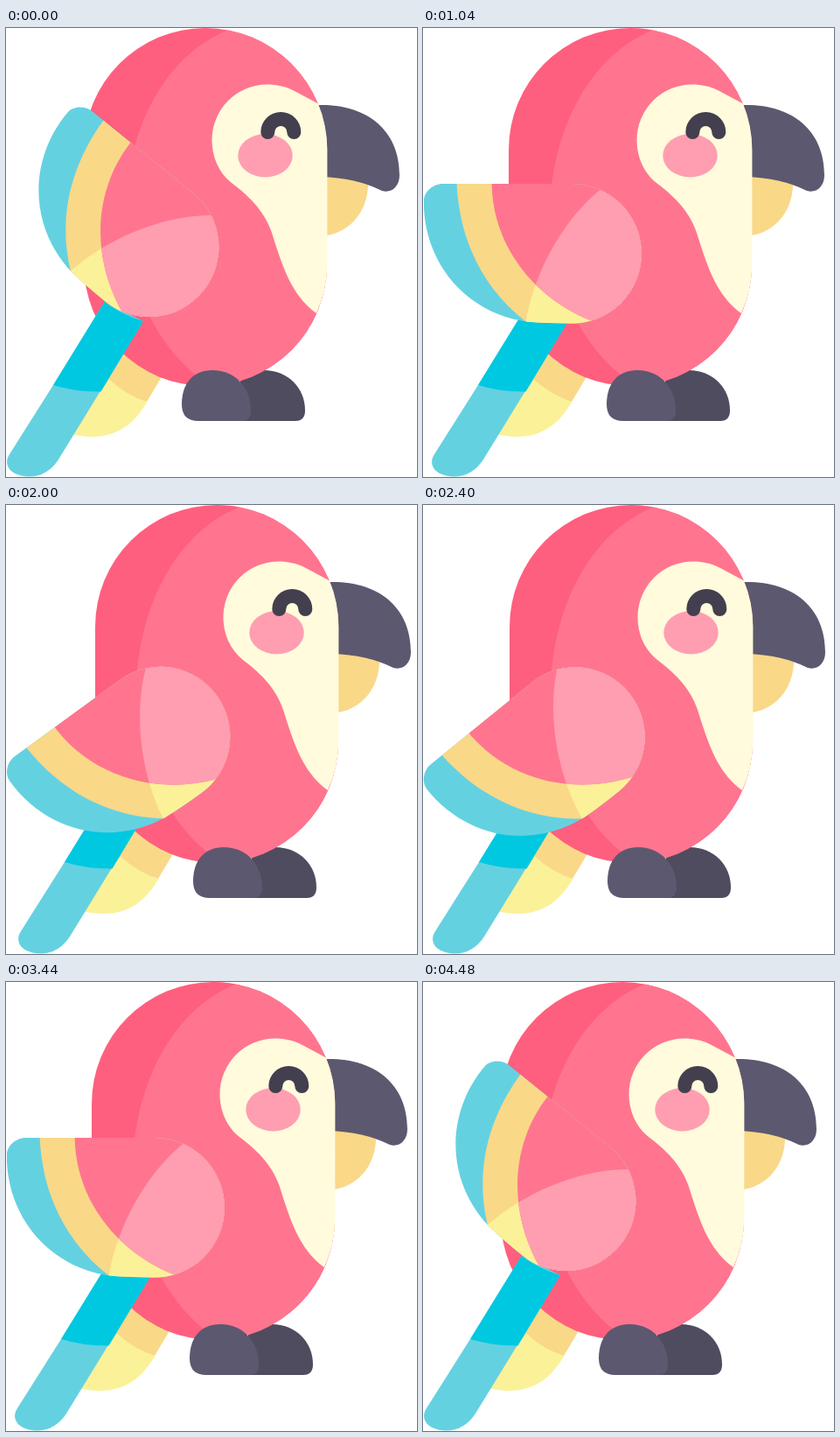
Recreate the animation shown at these times as an HTML page. Size 470 by 513 pixels, loop 4560 ms.

```html
<!DOCTYPE html>
<html lang="en">
<head>
<meta charset="utf-8">
<title>Parrot flapping its wing</title>
<style>
  html, body { margin: 0; width: 100%; height: 100%; overflow: hidden; background: #fff; }
  svg { display: block; }
</style>
</head>
<body>
<svg width="470" height="513" viewBox="0 0 470 513">
  <defs>
    <clipPath id="bodyClip"><rect x="89" width="278" height="409" rx="139"/></clipPath>
    <clipPath id="wingClip">
      <path id="wingShape" d="M.2 198C.2 270 50 327 120 335.800Q143 337.500 169.500 337.500A79.750 79.750 0 0 0 169.500 178H22C11 178 .2 187 .2 198Z"/>
    </clipPath>
    <path id="wingRed" d="M78 170V178C79 245 122 307 193 335L200 350H300V170Z"/>
    <clipPath id="redClip"><use href="#wingRed"/></clipPath>
    <path id="sheen" d="M230 165L203 184C160 218 126 280 117 335.500L115 350H300V165Z"/>
  </defs>
  <g id="bird">
    <!-- rear tail feather and rear foot -->
    <path fill="#f9d888" d="M125 360H201L161 427 100 440Z"/>
    <path fill="#fbf198" d="M118 401.500Q138 420 161.500 427C145 455 125 467 98 467Q86 467 70 463Z"/>
    <path fill="#4f4c5f" d="M268 449V391H295C322 391 342 411 342 437Q342 449 331 449Z"/>

    <!-- beak -->
    <path fill="#f9d888" d="M355 165L414 172C416 206 396 232 367 237H355Z"/>
    <path fill="#5c586f" d="M350 88H358C412 87 450 116 450 168C450 182 440 189 430 186Q400 171 360 170Z"/>

    <!-- body -->
    <g clip-path="url(#bodyClip)">
      <rect x="80" width="300" height="420" fill="#ff5f7e"/>
      <path fill="#ff758f" d="M261 0L255 2C188 28 141 105 136 205C138 285 165 360 228 405L240 415H380V0Z"/>
    </g>
    <path fill="#fffbdc" d="M357 86.500L329 71.500C319 66.500 309 64.500 299 64.500A63.500 63.500 0 0 0 235.500 128C235.500 148 244 166 258 177C275 190 295 207 304 234C316 272 326 305 355 326A139 139 0 0 0 367.400 270V139A139 139 0 0 0 357 86.500Z"/>
    <ellipse cx="296.500" cy="145.700" rx="31.200" ry="24.700" fill="#ff9eb1"/>
    <path d="M299.300 119A15 15 0 0 1 329.300 119" fill="none" stroke="#433f4f" stroke-width="16" stroke-linecap="round"/>

    <!-- front tail feather and foot -->
    <path fill="#64d1e1" d="M112.500 313L54 408 4 487C-4 499 5 512.500 27 512.500C42 512.500 53 504 60 493L157 335Z"/>
    <path fill="#00c8e1" d="M112.500 313Q133 328 157 335L108.500 415.500Q80 416 54 408Z"/>
    <path fill="#5c586f" d="M201 430C201 406 214 391 236 391C262 391 280 411 280 437Q280 449 270 449H220Q201 449 201 430Z"/>

    <g id="wing">
      <g clip-path="url(#wingClip)">
        <rect y="170" width="260" height="180" fill="#64d1e1"/>
        <path fill="#f9d888" d="M38 170V178C41 240 66 296 117 335.500V350H300V170Z"/>
        <use href="#sheen" fill="#fbf198"/>
        <use href="#wingRed" fill="#ff758f"/>
        <g clip-path="url(#redClip)"><use href="#sheen" fill="#ff9eb1"/></g>
      </g>
    </g>
  </g>
</svg>
<script>
  const STEP_MS = 80, STEPS = 57, HALF = 28;
  const PIVOT = { x: 181.2, y: 257.5 };   // in wing coordinates
  const WING_X = -8.4;                    // wing offset inside the bird
  const MARGIN = 0.7;

  const bird = document.getElementById('bird');
  const wing = document.getElementById('wing');
  const shape = document.getElementById('wingShape');
  const length = shape.getTotalLength();
  const outline = Array.from({ length: 300 }, (_, i) => {
    const p = shape.getPointAtLength(length * i / 300);
    return { x: p.x - PIVOT.x, y: p.y - PIVOT.y };
  });

  // Leftmost point of the rotated wing in bird coordinates
  function wingLeft(degrees) {
    const a = degrees * Math.PI / 180, c = Math.cos(a), s = Math.sin(a);
    return PIVOT.x + WING_X + Math.min(...outline.map(p => p.x * c - p.y * s));
  }

  function render(ms) {
    const step = Math.floor(ms / STEP_MS) % STEPS;
    const angle = 39 - 3 * (HALF - Math.abs(HALF - step));
    // The bird moves right by whole pixels to keep the wing tip on stage
    const shift = Math.max(0, Math.round(MARGIN - wingLeft(angle)));
    bird.setAttribute('transform', `translate(${shift} 0)`);
    wing.setAttribute('transform', `translate(${WING_X} 0) rotate(${angle} ${PIVOT.x} ${PIVOT.y})`);
  }

  const start = performance.now();
  function tick() {
    render(performance.now() - start);
    requestAnimationFrame(tick);
  }
  tick();
</script>
</body>
</html>
```
